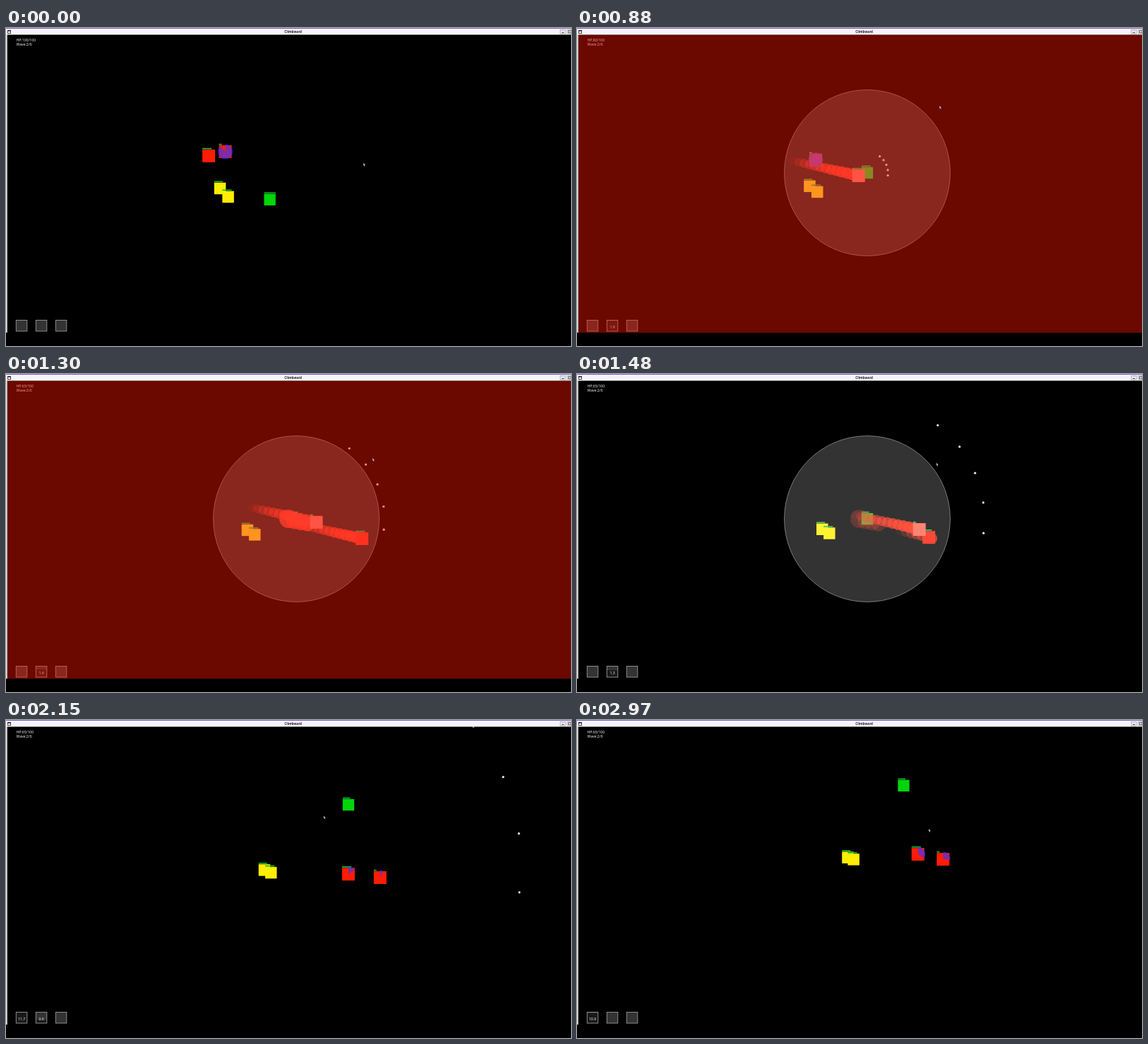
Animation, 800 px wide and 450 px high, one loop 3 s. Source, as an HTML page with a canvas:

```html
<!DOCTYPE html>
<html lang="en">
<head>
<meta charset="utf-8">
<title>Climbward</title>
<style>
html, body { margin: 0; width: 100%; height: 100%; overflow: hidden; background: #000; }
canvas { display: block; width: 100vw; height: 100vh; }
</style>
</head>
<body>
<canvas id="stage" width="800" height="450"></canvas>
<script>
const ctx = document.getElementById('stage').getContext('2d');
const LOOP = 3000, DT = 10;
const RAD = Math.PI / 180;
const SANS = '"Noto Sans", "Open Sans", sans-serif';

const STOP = 480, BLINK = 1890;
const RANGE = { on: 510, r: 117.5 };
const SHOT = { start: 752, speed: 0.2275, aim: -23, gap: 15, count: 5 };
const HIT1 = 860, HIT2 = 1130, FLASH_END = 1480;
const DASH = { time: 800, speed: 0.258, angle: 12.8 * RAD };
const TRAIL = { life: 380, gap: 30 };
const GAUGE = { delay: 150, rate: 0.08, carried: 315 };

const mix = (a, b, k) => a + (b - a) * k;
const clamp = (v) => Math.max(0, Math.min(1, v));

// Key points are [time, x, y]
function along(points, t) {
  let i = 1;
  while (i < points.length - 1 && points[i][0] < t) i++;
  const [t0, x0, y0] = points[i - 1], [t1, x1, y1] = points[i];
  const k = clamp((t - t0) / (t1 - t0));
  return [mix(x0, x1, k), mix(y0, y1, k)];
}

const arrive = [[0, 373.5, 243], [STOP, 411, 205]];
const depart = [[BLINK, 488, 136], [2520, 480.5, 97.5], [2970, 462.5, 93]];
const mouse = [[0, 506, 191], [610, 524, 178], [1060, 506, 65], [1300, 519, 119],
  [1850, 488, 139], [2520, 403, 131], [2970, 498, 154]];

const player = (t) => along(t < BLINK ? arrive : depart, t);

// Enemies chase the player; those with a dash time also charge in a straight line
function enemy(x, y, speed, hp, dashAt = Infinity) {
  const e = { hp, dashAt, dashEnd: dashAt + DASH.time, path: [] };
  for (let t = 0; t <= LOOP; t += DT) {
    e.path.push([x, y]);
    const [px, py] = player(t);
    const dash = dashing(e, t);
    const a = dash ? DASH.angle : Math.atan2(py - y, px - x);
    const d = DT * (dash ? DASH.speed : speed);
    x += d * Math.cos(a);
    y += d * Math.sin(a);
  }
  return e;
}

function dashing(e, t) {
  return t >= e.dashAt && t < e.dashEnd;
}

function place(e, t) {
  const i = Math.min(Math.floor(t / DT), e.path.length - 2);
  const k = t / DT - i, [x0, y0] = e.path[i], [x1, y1] = e.path[i + 1];
  return [mix(x0, x1, k), mix(y0, y1, k)];
}

const yellows = [enemy(303, 227, 0.0305, 0.73), enemy(314.5, 239, 0.0305, 0.8)];
const chargers = [enemy(287, 181, 0.0345, 0.73, 500), enemy(310.5, 175, 0.0345, 0.22, 895)];

function rect(x, y, w, h, color) {
  ctx.fillStyle = color;
  ctx.fillRect(x, y, w, h);
}

function disc(x, y, r, color) {
  ctx.fillStyle = color;
  ctx.beginPath();
  ctx.arc(x, y, r, 0, 2 * Math.PI);
  ctx.fill();
}

function outline(x, y, w, h, color, width) {
  ctx.strokeStyle = color;
  ctx.lineWidth = width;
  ctx.strokeRect(x, y, w, h);
}

function text(str, x, y, size, color, align = 'left', weight = 400) {
  ctx.font = `${weight} ${size}px ${SANS}`;
  ctx.textAlign = align;
  ctx.fillStyle = color;
  ctx.fillText(str, x, y);
}

function unit([x, y], size, color, hp) {
  const left = x - size / 2, top = y - size / 2;
  rect(left, top, size, size, color);
  rect(left, top - 2.2, size * hp, 1.7, '#0fbe2e');
}

function trail(e, t) {
  for (let s = e.dashAt + TRAIL.gap / 2; s < Math.min(t, e.dashEnd); s += TRAIL.gap) {
    const age = (t - s) / TRAIL.life;
    if (age >= 1) continue;
    const [x, y] = place(e, s);
    disc(x, y, 8.5 - 2.5 * age, `rgba(255,40,15,${0.9 * (1 - age * age)})`);
  }
}

function burst(t) {
  const age = (t - HIT2) / 420;
  if (age < 0 || age >= 1) return;
  const [x, y] = player(t);
  const color = `rgba(255,45,25,${Math.min(0.8, 1.4 * (1 - age))})`;
  for (let i = 0; i < 4; i++) disc(x - 11 + i * 9, y + i * 2.6, 13 - i, color);
}

function gauge(e, t) {
  const since = t - e.dashEnd - GAUGE.delay;
  if (since > 0) return since * GAUGE.rate;
  const waiting = t < e.dashAt && e === chargers[1];
  return waiting ? GAUGE.carried + t * GAUGE.rate : 0;
}

function pie([x, y], degrees) {
  if (degrees <= 0) return;
  ctx.fillStyle = 'rgba(60,50,255,0.65)';
  ctx.beginPath();
  ctx.moveTo(x, y);
  ctx.arc(x, y, 10.5, -Math.PI / 2, (Math.min(360, degrees) - 90) * RAD);
  ctx.fill();
}

function shots(t) {
  const d = (t - SHOT.start) * SHOT.speed;
  if (d <= 0) return;
  const [x, y] = player(SHOT.start);
  for (let i = 0; i < SHOT.count; i++) {
    const a = (SHOT.aim + (i - (SHOT.count - 1) / 2) * SHOT.gap) * RAD;
    disc(x + d * Math.cos(a), y + d * Math.sin(a), 1.6, '#e8e8e8');
  }
}

function range(t) {
  if (t < RANGE.on || t >= BLINK) return;
  disc(...player(t), RANGE.r, 'rgba(255,255,255,0.2)');
  ctx.strokeStyle = 'rgba(255,255,255,0.45)';
  ctx.lineWidth = 0.9;
  ctx.stroke();
}

// The shade drains downward as the cooldown runs out
function slot(x, usedAt, cooldown, t) {
  const size = 15.5, y = 413.5;
  const left = t < usedAt ? 0 : Math.max(0, cooldown - (t - usedAt) / 1000);
  const shade = size * left / cooldown;
  rect(x, y, size, size, '#333');
  rect(x, y + size - shade, size, shade, 'rgba(0,0,0,0.5)');
  outline(x, y, size, size, '#999', 0.9);
  if (left > 0) text(left.toFixed(1), x + size / 2, 425.2, 5.2, '#eee', 'center');
}

function hud(t, hp) {
  text(`HP:${hp}/100`, 14.5, 18.6, 5.1, '#eee');
  text('Wave:2/6', 14.5, 25, 5.1, '#eee');
  slot(14.3, BLINK, 12, t);
  slot(42.3, SHOT.start - 20, 2, t);
  slot(70.3, Infinity, 1, t);
}

function pointer(x, y) {
  ctx.save();
  ctx.translate(x, y);
  ctx.fillStyle = '#b4b4b4';
  ctx.fill(new Path2D('M0 0L2.8 2.8L1.8 3L2.3 4.6L1.5 4.8L.9 3.3L0 3.8Z'));
  ctx.restore();
}

function titleBar() {
  rect(0, 0, 800, 9.5, '#f5f5f7');
  rect(0, 0, 800, 1, '#8458d0');
  rect(0, 9, 1.8, 422, '#dcdcdc');
  rect(2, 3, 5, 5, '#222');
  rect(2.8, 4.6, 3.4, 2.6, '#fff');
  for (const x of [784.5, 794.5]) {
    rect(x, 2, 8, 6.5, '#999');
    rect(x + 0.6, 2.6, 6.8, 5.3, '#e4e4e4');
  }
  rect(787, 6, 3, 0.8, '#333');
  outline(796.5, 3.8, 3.5, 3, '#444', 0.7);
  text('Climbward', 406.7, 6.8, 4.6, '#222', 'center', 700);
}

function draw(t) {
  const hp = t < HIT1 ? 100 : t < HIT2 ? 80 : 65;
  rect(0, 0, 800, 450, '#000');
  ctx.save();
  ctx.beginPath();
  ctx.rect(1.8, 9.5, 798.2, 421.7);
  ctx.clip();
  unit(player(t), 16.3, '#00d50a', hp / 100);
  for (const e of yellows) unit(place(e, t), 16.5, '#ffee00', e.hp);
  for (const e of chargers) trail(e, t);
  burst(t);
  for (const e of chargers) unit(place(e, t), 18, dashing(e, t) ? '#ff6450' : '#ff1c04', e.hp);
  for (const e of chargers) pie(place(e, t), gauge(e, t));
  shots(t);
  range(t);
  hud(t, hp);
  if (t >= HIT1 && t < FLASH_END) rect(0, 0, 800, 450, 'rgba(255,19,0,0.42)');
  pointer(...along(mouse, t));
  ctx.restore();
  titleBar();
}

const began = performance.now();
function tick() {
  draw((performance.now() - began) % LOOP);
  requestAnimationFrame(tick);
}
tick();
</script>
</body>
</html>
```
